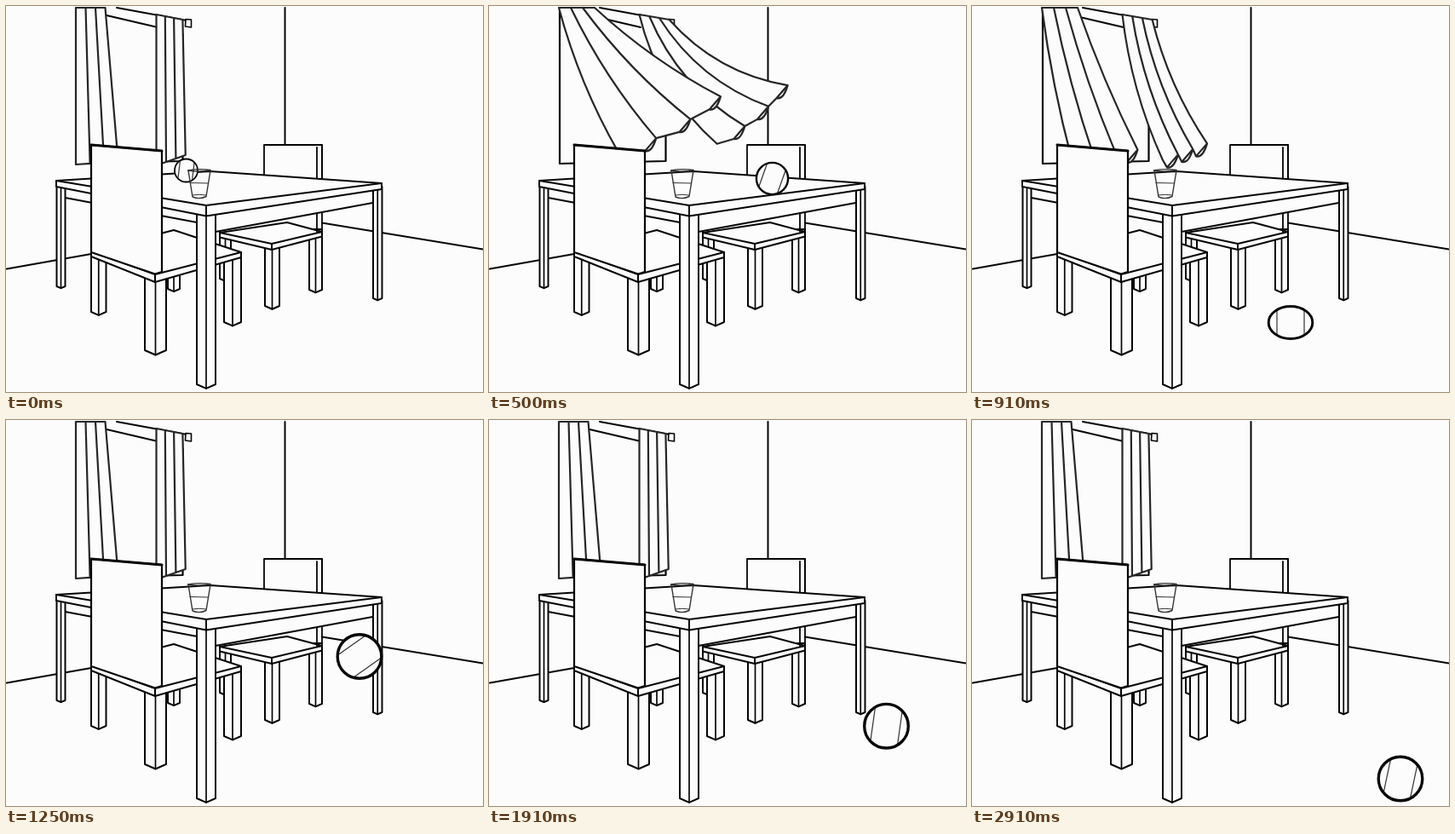
Write an HTML page with a canvas that moves like this. It is 560 px wide and 453 px high and loops after 3 s.

```html
<!DOCTYPE html>
<html lang="en">
<head>
<meta charset="utf-8">
<title>Bouncing ball</title>
<style>
  html, body { margin: 0; width: 100%; height: 100%; overflow: hidden; background: #fcfcfc; }
  canvas { display: block; }
</style>
</head>
<body>
<canvas id="stage" width="560" height="453"></canvas>
<script>
const ctx = document.getElementById('stage').getContext('2d');
const PAPER = '#fcfcfc', INK = '#050505', CLOTH = '#262626';
const LOOP = 3000;
const mix = (a, b, k) => a + (b - a) * k;

function stroke(path, width = 2, color = INK) {
  ctx.lineWidth = width;
  ctx.strokeStyle = color;
  ctx.stroke(path);
}

const line = (d, width, color) => stroke(new Path2D(d), width, color);

function panel(d, width) {
  const path = new Path2D(d);
  ctx.fill(path);
  stroke(path, width);
}

// Square leg seen from its front corner
function leg(x, w, top, bottom) {
  const mid = x + w / 2, low = bottom + w * .22;
  panel(`M${x} ${top}V${bottom}L${mid} ${low}L${x + w} ${bottom}V${top}Z`);
  line(`M${mid} ${top}V${low}`, 1.7);
}

// Flat board: left, front, right and back corners, thickness at the sides and the front
function board([lx, ly], [fx, fy], [rx, ry], [bx, by], side, front) {
  panel(`M${lx} ${ly}L${bx} ${by}L${rx} ${ry}v${side}L${fx} ${fy + front}L${lx} ${ly + side}Z`);
  line(`M${lx} ${ly}L${fx} ${fy}L${rx} ${ry}M${fx} ${fy}v${front}`);
}

function drawRoom() {
  line('M327.5 2V163M371 254.5L560 285.5M1 308.5L100 291');
  line('M83 5V185L207.5 182V33', 2.2);
  line('M130 2L212 17M118 11L178 25');
  panel('M211 15.5L217.5 16V25L210.5 24Z', 1.6);
}

function drawFurniture() {
  // far chair
  panel('M303 203V163H371V203Z', 1.8);
  leg(251, 13, 268, 320);
  leg(356, 15, 262, 333);
  leg(304, 17, 280, 352);
  board([251, 266], [312, 279], [371, 265], [330, 254], 5.5, 7);
  line('M365 166V265M371 163V333', 1.8);

  // near chair and table
  leg(190, 14, 314, 332);
  leg(256, 20, 292, 371);
  leg(100, 17.5, 288, 359);
  leg(163, 25, 312, 404);
  board([100, 288], [175, 315], [276, 289], [197, 263], 6, 9);
  panel('M64 211L235 246L436 215V230L235 267V256L64 224Z', 1.8);
  leg(59.5, 10, 210, 329);
  leg(431, 10.5, 212, 343);
  leg(224, 22, 240, 444);
  board([59, 205], [235, 234], [441, 208], [240, 194], 7, 12.5);
  panel('M100 163L183 170V312L175 314.5L100 289Z', 2.2);
  line('M100 163L183 170', 3);
}

function drawGlass() {
  line('M213.5 193Q227 190.5 240 192.5Q227 195.5 213.5 193', 1.4, '#333');
  line('M214 193L219 224Q227 227.5 235 223.5L240 193', 1.4, '#333');
  line('M216 207.5L237.5 208M218.5 222Q227 220.5 235 222', 1, '#333');
}

// Angles in degrees: lean per unit of wind, splay and fan between neighbouring folds
const curtains = [
  { x: 176.5, y: 10, drop: 2, gap: 10.3, widen: 1.4, size: 177, taper: 6, lean: 15.5, splay: .4, fan: 2.4, bow: 7 },
  { x: 82, y: 2, drop: 0, gap: 11.5, widen: 2.5, size: 184, taper: 1, lean: 11.2, splay: 1.6, fan: 2.3, bow: 3 },
];

function drawCurtain(c, wind) {
  const open = Math.max(0, Math.min(1, wind));
  const folds = [0, 1, 2, 3].map(j => {
    const x = c.x + j * (c.gap + c.widen * open), y = c.y + j * c.drop;
    const angle = (c.lean * wind + j * (c.splay + c.fan * wind * Math.abs(wind))) * Math.PI / 180;
    const size = c.size - j * c.taper, sin = Math.sin(angle), cos = Math.cos(angle);
    const bow = 2 * c.bow * wind;
    return {
      top: [x, y],
      bend: [x + size * sin / 2 - bow * cos, y + size * cos / 2 + bow * sin],
      tip: [x + size * sin, y + size * cos],
    };
  });

  // The cloth runs to a crease, then curls back up to the next tip
  const curl = ([x, y], dx, dy) => [x + dx * open, y + dy * open];
  const hem = (path, tip) => {
    path.lineTo(...curl(tip, -13, 15));
    path.quadraticCurveTo(...curl(tip, -5, 17), ...tip);
  };

  const cloth = new Path2D(), seams = new Path2D();
  folds.forEach(({ top, bend, tip }, j) => {
    seams.moveTo(...top);
    seams.quadraticCurveTo(...bend, ...tip);
    if (j) {
      hem(cloth, tip);
      seams.lineTo(...curl(tip, -13, 15));
      seams.moveTo(...folds[j - 1].tip);
      hem(seams, tip);
    } else {
      cloth.moveTo(...top);
      cloth.quadraticCurveTo(...bend, ...tip);
    }
  });
  cloth.quadraticCurveTo(...folds[3].bend, ...folds[3].top);
  cloth.closePath();
  ctx.fill(cloth);
  seams.moveTo(...folds[0].top);
  seams.lineTo(...folds[3].top);
  stroke(seams, 2.2, CLOTH);
}

// Knots start with the step they belong to
const gust = [[0, 0], [4, 2.2], [6, 2], [11, 1], [13, -1.5], [15, 0]];
const spin = [[0, 7], [11, 360], [19, 470], [27, 626], [35, 732]];
const route = [[0, 211.5, 193], [6, 332.5, 202.5], [7, 366, 215], [11, 374, 371.5], [15, 415, 277.5],
  [21, 455.5, 404], [24, 472, 352], [27, 487, 414], [28, 486, 422], [31, 495, 408], [33, 503, 427.5], [35, 503, 421]];
const landings = [11, 21, 28, 33];

function between(knots, n) {
  const i = Math.max(1, knots.findIndex(knot => knot[0] >= n));
  const a = knots[i - 1], b = knots[i];
  return [a, b, (n - a[0]) / (b[0] - a[0])];
}

function track(knots, n) {
  if (n >= knots[knots.length - 1][0]) return knots[knots.length - 1][1];
  const [a, b, k] = between(knots, n);
  return mix(a[1], b[1], k);
}

// Falling speeds up, rising slows down
function height(n) {
  const [a, b, k] = between(route, n);
  return mix(a[2], b[2], b[2] > a[2] ? k ** 1.6 : 1 - (1 - k) ** 1.8);
}

function drawBall(n) {
  const x = track(route, n), y = height(n);
  const r = Math.min(25.8, 13.5 + .85 * n);
  const flat = landings.includes(n);
  const rx = r * (flat ? 1.13 : 1), ry = r * (flat ? .83 : 1);

  const ring = new Path2D();
  ring.ellipse(x, y, rx, ry, 0, 0, 7);
  ctx.fill(ring);

  const a = track(spin, n) * Math.PI / 180;
  const cos = Math.cos(a), sin = Math.sin(a);
  const at = (u, v) => [x + rx * (u * cos - v * sin), y + ry * (u * sin + v * cos)];
  const bands = new Path2D();
  for (const u of [-.62, .62]) {
    bands.moveTo(...at(u, -.78));
    bands.lineTo(...at(u, .78));
  }
  stroke(bands, 1.2, '#333');
  stroke(ring, r * .13);
}

function render(t) {
  // Twelve pictures a second on a 10 ms clock
  const n = Math.ceil(3 * (Math.floor(t / 10) + 1) / 25) - 1;
  ctx.fillStyle = PAPER;
  ctx.fillRect(0, 0, 560, 453);
  drawRoom();
  const wind = track(gust, n);
  curtains.forEach(c => drawCurtain(c, wind));
  drawFurniture();
  drawBall(n);
  drawGlass();
}

ctx.lineJoin = ctx.lineCap = 'round';
let start;
function tick(now) {
  start ??= now;
  render((now - start) % LOOP);
  requestAnimationFrame(tick);
}
render(0);
requestAnimationFrame(tick);
</script>
</body>
</html>
```
